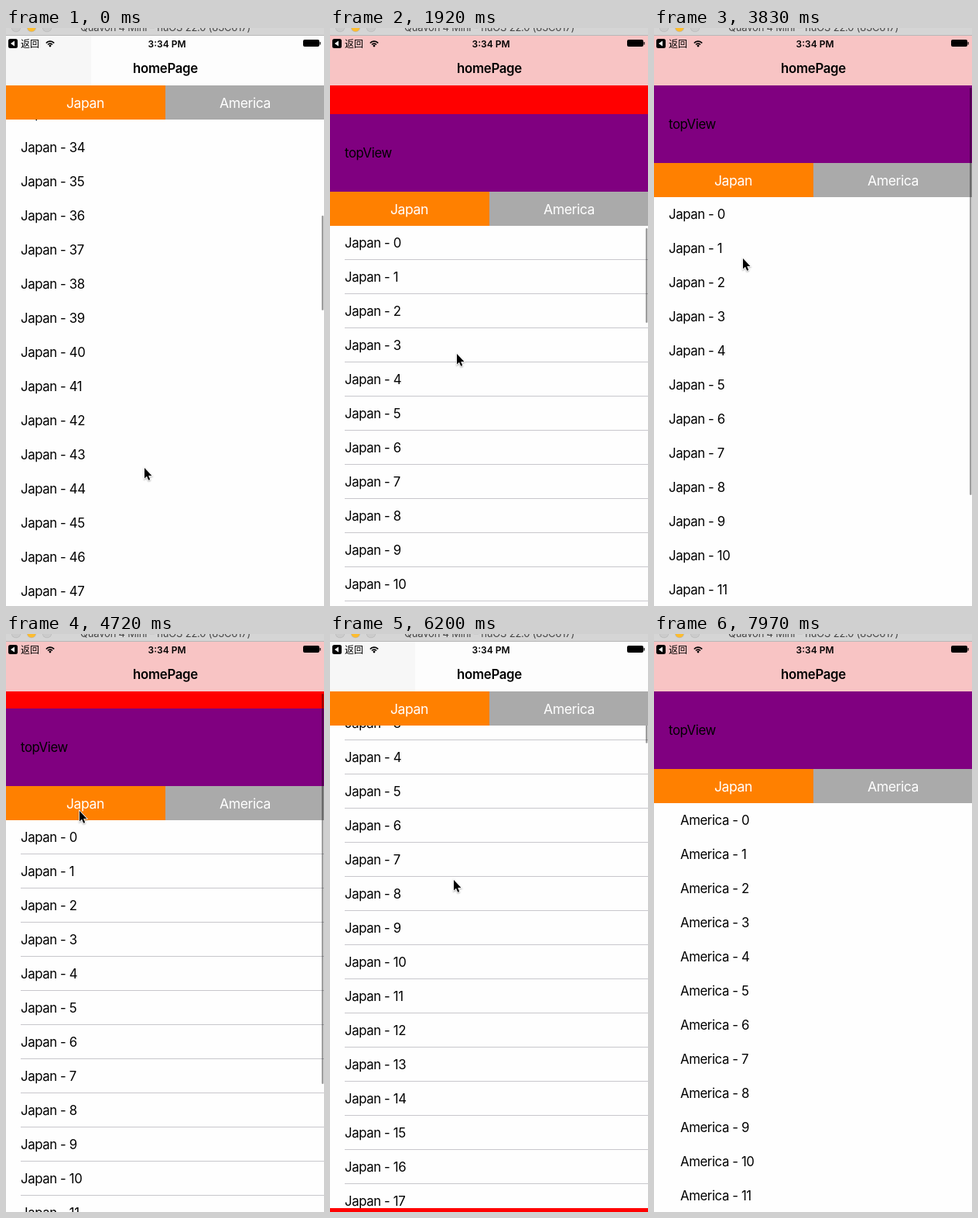
Write an HTML page with a canvas that moves like this. It is 411 by 745 pixels and loops after 8000 ms.

```html
<!DOCTYPE html>
<html lang="en">
<head>
<meta charset="utf-8">
<title>Sticky tabs</title>
<style>
  html, body { margin: 0; width: 100%; height: 100%; overflow: hidden; background: #fff; }
  canvas { display: block; }
</style>
</head>
<body>
<canvas id="stage" width="411" height="745"></canvas>
<script>
const W = 411, H = 745, NAV = 74, LOOP = 8000, STEP = 147.4;
const TOP_H = 100, TAB_H = 44, ROW = 44, CELL_H = 732, ROWS = 100;
const MAX_SCROLL = TOP_H + TAB_H + CELL_H - (H - NAV);
const SANS = 'Inter, Roboto, "Noto Sans CJK SC", sans-serif';
const BAR_COLOR = 'rgba(0,0,0,.38)';
const ARROW = new Path2D('M0 0V13.5L3 10.8L5.2 15.8L7.2 15L5.2 10H9.4Z');
const ctx = document.getElementById('stage').getContext('2d');

const clamp = v => Math.max(0, Math.min(1, v));

// Smooth rise from 0 to 1 between two steps.
function ramp(step, from, to) {
  const u = clamp((step - from) / (to - from));
  return u * u * (3 - 2 * u);
}

// Smooth rise and return, 0 to 1 to 0.
const bump = (step, from, to) => Math.sin(Math.PI * clamp((step - from) / (to - from)));

// Page scroll: flung to the top, pulled down three times, flung to the end and back.
function outerScroll(step) {
  const travel = 1 - ramp(step, 8, 11.3) + ramp(step, 34, 39) - ramp(step, 43, 48);
  const pulls = 37 * bump(step, 10, 16) + 75 * bump(step, 17, 25) + 34 * bump(step, 25, 34);
  return Math.round(MAX_SCROLL * travel - pulls + 5 * bump(step, 39, 45));
}

const innerScroll = step => Math.round(1377 * (1 - ramp(step, 0, 9)) + 47 * bump(step, 38, 46));
const swipeOffset = step => Math.round(396 * ramp(step, 48, 54));

// The pointer glides between a few resting points and leaves on the left.
function pointer(step) {
  const stops = [[0, 179, 567], [9, 167, 533], [13, 164, 420], [21, 124, 326],
    [32, 95, 228], [42, 160, 317], [52, -20, 415]];
  let [, x, y] = stops[0];
  for (let i = 1; i < stops.length; i++) {
    const [from, x0, y0] = stops[i - 1], [to, x1, y1] = stops[i];
    const u = ramp(step, from, to);
    x += (x1 - x0) * u;
    y += (y1 - y0) * u;
  }
  return [Math.round(x), Math.round(y)];
}

function rect(color, x, y, w, h) {
  ctx.fillStyle = color;
  ctx.fillRect(x, y, w, h);
}

function pill(color, x, y, w, h, r) {
  ctx.fillStyle = color;
  ctx.beginPath();
  ctx.roundRect(x, y, w, h, r);
  ctx.fill();
}

const disc = (color, x, y, r) => pill(color, x - r, y - r, 2 * r, 2 * r, r);

function text(str, x, y, size, { color = '#000', weight = 400, align = 'left', spacing = -0.4 } = {}) {
  ctx.font = `${weight} ${size}px ${SANS}`;
  ctx.letterSpacing = spacing + 'px';
  ctx.textAlign = align;
  ctx.fillStyle = color;
  ctx.fillText(str, x, y);
}

function list(name, x, firstY) {
  // Hairlines only survive the downscaled screen at every third pixel offset.
  const hairlines = ((firstY % 3) + 3) % 3 === 1;
  for (let i = 0; i < ROWS; i++) {
    const y = firstY + i * ROW;
    if (y < NAV || y > H + ROW) continue;
    text(`${name} - ${i}`, x + 19, y + 6, 16.8);
    if (hairlines) rect('#c8c7cc', x + 19, y + 21, W - 19, 1);
  }
}

function content(step, outer) {
  const inner = innerScroll(step), swipe = swipeOffset(step);
  const topY = NAV - outer;
  const tabY = Math.max(NAV, topY + TOP_H);
  const listY = tabY + TAB_H;
  const cellY = topY + TOP_H + TAB_H;
  const pulling = step > 16 && step < 38;

  rect('#f00', 0, NAV, W, H - NAV);
  rect('#800080', 0, topY, W, TOP_H);
  text('topView', 19, topY + 56, 16.8);

  ctx.save();
  ctx.beginPath();
  ctx.rect(0, listY, W, cellY + CELL_H - listY);
  ctx.clip();
  rect('#fefefe', 0, 0, W, H);
  list('Japan', -swipe, cellY + ROW / 2 - inner);
  if (swipe) list('America', W - swipe, cellY + ROW / 2);
  if (!pulling && step < 47) pill(BAR_COLOR, 408, cellY + 3 + inner * 0.164, 2.5, 122, 1.2);
  ctx.restore();

  rect('#ff8000', 0, tabY, 206, TAB_H);
  rect('#aaa', 206, tabY, W - 206, TAB_H);
  const label = { color: '#fff', align: 'center' };
  text('Japan', 102.5, tabY + 28.5, 17.6, label);
  text('America', 309, tabY + 28.5, 17.6, label);

  if (pulling)
    pill(BAR_COLOR, 408, 77 + Math.max(0, outer) * 0.7, 2.5, 525 + Math.min(0, outer), 1.2);
}

function navBar(outer) {
  const tint = u => `rgb(${248 + 5 * u}, ${196 + 57 * u}, ${196 + 57 * u})`;
  const fill = ctx.createLinearGradient(0, 10, 0, NAV);
  fill.addColorStop(0, tint(clamp((outer - 155) / 50)));
  fill.addColorStop(1, tint(clamp((outer - 110) / 95)));
  rect(fill, 0, 10, W, NAV - 10);
  if (outer > 200) rect('#f7f7f7', 0, 10, 110, NAV - 10);
  text('homePage', 206, 58, 16.8, { weight: 600, align: 'center', spacing: -0.3 });
}

function statusBar() {
  pill('#000', 3, 14, 12, 12, 2.5);
  ctx.fillStyle = '#fff';
  ctx.fill(new Path2D('M6 20L11 16.5V23.5Z'));
  text('返回', 19, 24.5, 12, { spacing: 0 });

  ctx.strokeStyle = '#000';
  ctx.lineWidth = 1.7;
  for (const r of [3.8, 6.8]) {
    ctx.beginPath();
    ctx.arc(57, 24, r, -Math.PI * 0.77, -Math.PI * 0.23);
    ctx.stroke();
  }
  disc('#000', 57, 23, 1.4);

  text('3:34 PM', 208, 24.5, 12, { weight: 600, align: 'center', spacing: 0 });
  pill('#000', 384, 15, 21, 9, 2);
  rect('#000', 405.5, 18, 1.2, 3.5);
}

function titleBar() {
  rect('#d5d5d5', 0, 0, W, 10);
  rect('#b8b8b8', 0, 9, W, 1);
  ['#cbcbcb', '#fdbc2e', '#cbcbcb'].forEach((color, i) => {
    disc('#b9b9b9', 13 + i * 20, -1, 6.2);
    disc(color, 13 + i * 20, -1, 5.5);
  });
  text('Quavon 4 Mini – nuOS 22.0 (83C617)', 206, 4, 13, { color: '#444', align: 'center', spacing: -0.2 });
}

function cursor(step) {
  ctx.save();
  ctx.translate(...pointer(step));
  ctx.shadowColor = 'rgba(0,0,0,.35)';
  ctx.shadowBlur = 2;
  ctx.shadowOffsetY = 1;
  ctx.strokeStyle = '#fff';
  ctx.lineWidth = 1.6;
  ctx.stroke(ARROW);
  ctx.shadowColor = 'transparent';
  ctx.fillStyle = '#000';
  ctx.fill(ARROW);
  ctx.restore();
}

function draw(now) {
  const step = Math.floor((now % LOOP) / STEP);
  const outer = outerScroll(step);
  content(step, outer);
  navBar(outer);
  statusBar();
  titleBar();
  cursor(step);
}

const start = performance.now();
function tick() {
  draw(performance.now() - start);
  requestAnimationFrame(tick);
}
tick();
</script>
</body>
</html>
```
